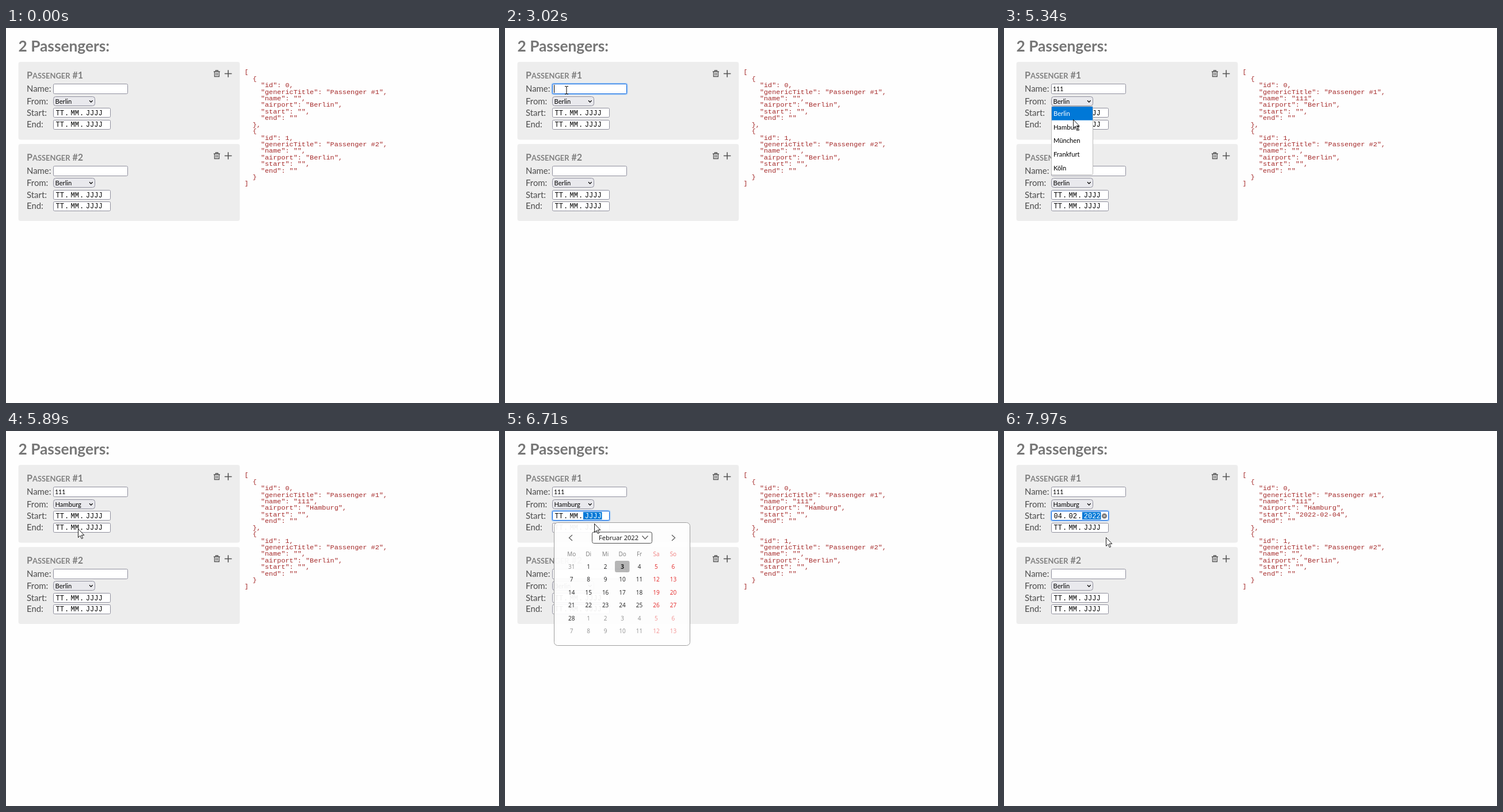
Write an HTML page that moves like this. It is 857 px wide and 653 px high and loops after 8000 ms.

```html
<!DOCTYPE html>
<html lang="en">
<head>
<meta charset="utf-8">
<title>Passengers</title>
<style>
html, body { margin: 0; width: 100%; height: 100%; overflow: hidden; background: #fefefe; }
svg { display: block; font-family: Lato, sans-serif; }
.head { font-size: 26.3px; font-weight: 700; fill: #767676; }
.title { font-size: 16.1px; font-weight: 700; fill: #808080; }
.small { font-size: 12.9px; }
.label { font-size: 14.9px; fill: #4c4c4c; }
.ctl { font-size: 11.2px; }
.num { font-size: 10.5px; }
.mono { font: 12px "Liberation Mono", monospace; }
.json { font-size: 11.83px; fill: #a52a2a; }
.cal { font: 10px "Open Sans", sans-serif; text-anchor: middle; }
.month { font-size: 11.1px; }
.line { fill: none; stroke: #555; stroke-width: 1.3; }
</style>
</head>
<body>
<svg id="stage" width="857" height="653" viewBox="0 0 857 653"></svg>
<script>
const LOOP = 8000;
const stage = document.getElementById('stage');
const BORDER = '#8f8f9d', HOVER = '#62626e', BLUE = '#0078d7';

// Row centres of the two cards
const rows = [[106, 127.5, 147.5, 168], [248.5, 269.5, 290.5, 310]];

// Pointer positions, each held until the next: time, x, y
const moves = [
  [1370, 110, 123], [1490, 107, 111], [1630, 107, 109], [1770, 107, 108],
  [4470, 109, 113], [4620, 112, 118], [4760, 115, 124], [4900, 116, 128],
  [5040, 117, 133], [5180, 118, 146], [5320, 120, 159], [5460, 122, 167], [5610, 125, 170],
  [6030, 129, 167], [6170, 138, 160], [6310, 147, 153], [6440, 152, 150], [6570, 154, 152],
  [6710, 155, 161], [6980, 162, 171], [7120, 176, 188], [7260, 195, 207],
  [7400, 212, 224], [7550, 223, 235], [7700, 227, 238], [7850, 218, 230], [7970, 177, 185]
];

const text = (x, y, s, cls, more = '') => `<text x="${x}" y="${y}" class="${cls}" ${more}>${s}</text>`;
const rect = (x, y, w, h, r, fill, stroke = 'none', more = '') =>
  `<rect x="${x}" y="${y}" width="${w}" height="${h}" rx="${r}" fill="${fill}" stroke="${stroke}" ${more}/>`;
const path = (d, more = 'class="line"') => `<path d="${d}" ${more}/>`;

function box(y, w, h, { focus, hover, fill = '#fff', r = 2 } = {}) {
  const top = Math.floor(y - h / 2) + .5;
  return (focus ? rect(81.5, top - 1, w + 2, h + 2, 3, 'none', '#a9cdf5', 'stroke-width="2"') : '') +
    rect(82.5, top, w, h, r, fill, focus ? '#0060df' : hover ? HOVER : BORDER);
}

function dateField(y, value, focus) {
  const [d, m, yr] = value ? value.split('-').reverse() : ['TT', 'MM', 'JJJJ'];
  const base = y + 4;
  let s = box(y, 99, 16, { focus });
  if (focus) s += rect(136, y - 6.5, 32.5, 13, 0, BLUE);
  s += text(86.5, base, d, 'mono') + text(102, base, '.', 'mono') +
    text(112.5, base, m, 'mono') + text(128, base, '.', 'mono') +
    text(138.8, base, yr, 'mono', focus ? 'fill="#fff"' : '');
  if (value) s += `<circle cx="174.5" cy="${y + .5}" r="4.5" fill="#777"/>` +
    path(`M172.8 ${y - 1.2}l3.4 3.4m0-3.4l-3.4 3.4`, 'stroke="#fff"');
  return s;
}

function card(i, p, ui) {
  const [name, from, start, end] = rows[i], dy = i * 143;
  let s = rect(21.5, 59 + dy, 385, i ? 134 : 135.5, 4, '#ededed') +
    text(36, 88 + dy, `P<tspan class="small">ASSENGER</tspan> #${i + 1}`, 'title');
  ['Name:', 'From:', 'Start:', 'End:'].forEach((l, k) => s += text(36, rows[i][k] + 5, l, 'label'));
  s += path(`M361 ${76 + dy}h11m-7.5 0v-2h4v2m-6 0v8.5h8v-8.5m-5.3 2v4.5m2.6-4.5v4.5`) +
    path(`M380 ${79.5 + dy}h12.5m-6.2-6.2v12.4`, 'class="line" style="stroke-width:1.6"');
  s += box(name, 129, 17, { focus: ui.nameFocus, hover: ui.nameHover }) + text(85, name + 4, p.name, 'num');
  if (ui.caret) s += rect(85 + p.name.length * 6.1, name - 7, 1, 14, 0, '#000');
  s += box(from, 72, 16, { hover: ui.fromHover, fill: '#e9e9ed', r: 4 }) + text(85.5, from + 4.3, p.airport, 'ctl') +
    path(`M145 ${from - 1.2}l2.8 2.8 2.8-2.8`, 'fill="none" stroke="#000" stroke-width="1.3"');
  return s + dateField(start, p.start, ui.startFocus) + dateField(end, p.end);
}

function json(list) {
  const lines = JSON.stringify(list, null, 2).split('\n');
  return lines.map((l, i) => {
    const body = l.trimStart();
    return text(414.5 + (l.length - body.length) * 7.1, (80.4 + i * 11.41).toFixed(2), body, 'mono json');
  }).join('');
}

function options(opacity, y) {
  const towns = ['Berlin', 'Hamburg', 'München', 'Frankfurt', 'Köln'];
  const hot = Math.max(0, Math.floor((y - 136) / 24));
  return `<g opacity="${opacity}">` + rect(82.5, 136.5, 72, 119, 2, '#fff', '#bbb') +
    towns.map((n, i) => (i === hot ? rect(83, 137 + i * 23.7, 71, 23.7, 0, BLUE) : '') +
      text(86, 153 + i * 23.7, n, 'ctl', i === hot ? 'fill="#fff"' : '')).join('') + '</g>';
}

function calendar(opacity, hover) {
  let s = `<g opacity="${opacity}" class="cal">` + rect(85.5, 159.5, 236, 214, 6, '#fff', '#999') +
    path('M117 181l-5.5 5 5.5 5M290 181l5.5 5-5.5 5M238.5 182.5l5 5.5 5-5.5') +
    rect(151.5, 176, 104, 19.5, 3, 'none', '#444') +
    text(197.5, 190, 'Februar 2022', 'month');
  const colX = i => 115.7 + i * 29.45;
  ['Mo', 'Di', 'Mi', 'Do', 'Fr', 'Sa', 'So'].forEach((d, i) =>
    s += text(colX(i), 217.5, d, '', `fill="${i > 4 ? '#f07878' : '#777'}"`));
  for (let k = 0; k < 42; k++) {
    const day = new Date(2022, 0, 31 + k), col = k % 7, y = 236.3 + Math.floor(k / 7) * 22.35;
    const inside = day.getMonth() === 1, today = k === 3;
    if (today) s += rect(191, 226, 25.5, 20, 3, '#b3b3b3');
    if (k === 4 && hover) s += rect(220.5, 226.5, 25, 19, 3, '#ccc', '#333');
    const fill = col > 4 ? (inside ? '#e31b1b' : '#f38b8b') : inside ? '#111' : '#888';
    s += text(colX(col), (y + 3.8).toFixed(2), day.getDate(), '', `fill="${fill}" ${today ? 'font-weight="700"' : ''}`);
  }
  return s + '</g>';
}

function pointerAt(t) {
  if (t < 400) return null;
  if (t < 1370) {
    const p = Math.floor((t - 400) / 138.6) / 7, e = 1 - (1 - p) ** 2;
    return [314 - 204 * e, 590 - 467 * e];
  }
  return moves.filter(m => m[0] <= t).pop().slice(1);
}

function pointer(x, y, beam) {
  return `<g transform="translate(${x} ${y})">` + (beam
    ? path('M-3 -6.5h2.2l.8 1 .8-1H3M0-6V6.5M-3 7h2.2l.8-1 .8 1H3', 'fill="none" stroke="#000"')
    : path('M.5 .5V15.5l3.5-3.3 2.4 5.4 2.2-1-2.4-5.2h4.6z', 'fill="#fff" stroke="#000" stroke-width=".9"')) + '</g>';
}

function draw(t) {
  const within = (a, b) => t >= a && t < b;
  const typed = t < 3330 ? 0 : t < 3460 ? 1 : t < 3600 ? 2 : 3;
  const people = [0, 1].map(id => ({
    id, genericTitle: 'Passenger #' + (id + 1), name: id ? '' : '1'.repeat(typed),
    airport: !id && t >= 5890 ? 'Hamburg' : 'Berlin',
    start: !id && t >= 7850 ? '2022-02-04' : '', end: ''
  }));
  const ui = {
    nameFocus: within(1910, 4900),
    nameHover: within(1490, 1910),
    fromHover: within(1370, 1490) || within(4620, 5180),
    caret: within(1910, 2440) || within(3020, 4040) || within(4470, 4900),
    startFocus: t >= 6570
  };
  let s = text(21.5, 40.5, '2 Passengers:', 'head') + card(0, people[0], ui) + card(1, people[1], {}) + json(people);
  const at = pointerAt(t);
  if (within(5040, 5890)) s += options(t < 5180 ? .7 : 1, at[1]);
  if (within(6570, 7850)) s += calendar(t < 6710 ? .4 : t < 6860 ? .94 : 1, t >= 7550);
  if (at && !within(3330, 4470)) s += pointer(...at, within(1490, 4620));
  return s;
}

let shown = '';
function frame(now) {
  const s = draw(now % LOOP);
  if (s !== shown) stage.innerHTML = shown = s;
  requestAnimationFrame(frame);
}
frame(0);
</script>
</body>
</html>
```
